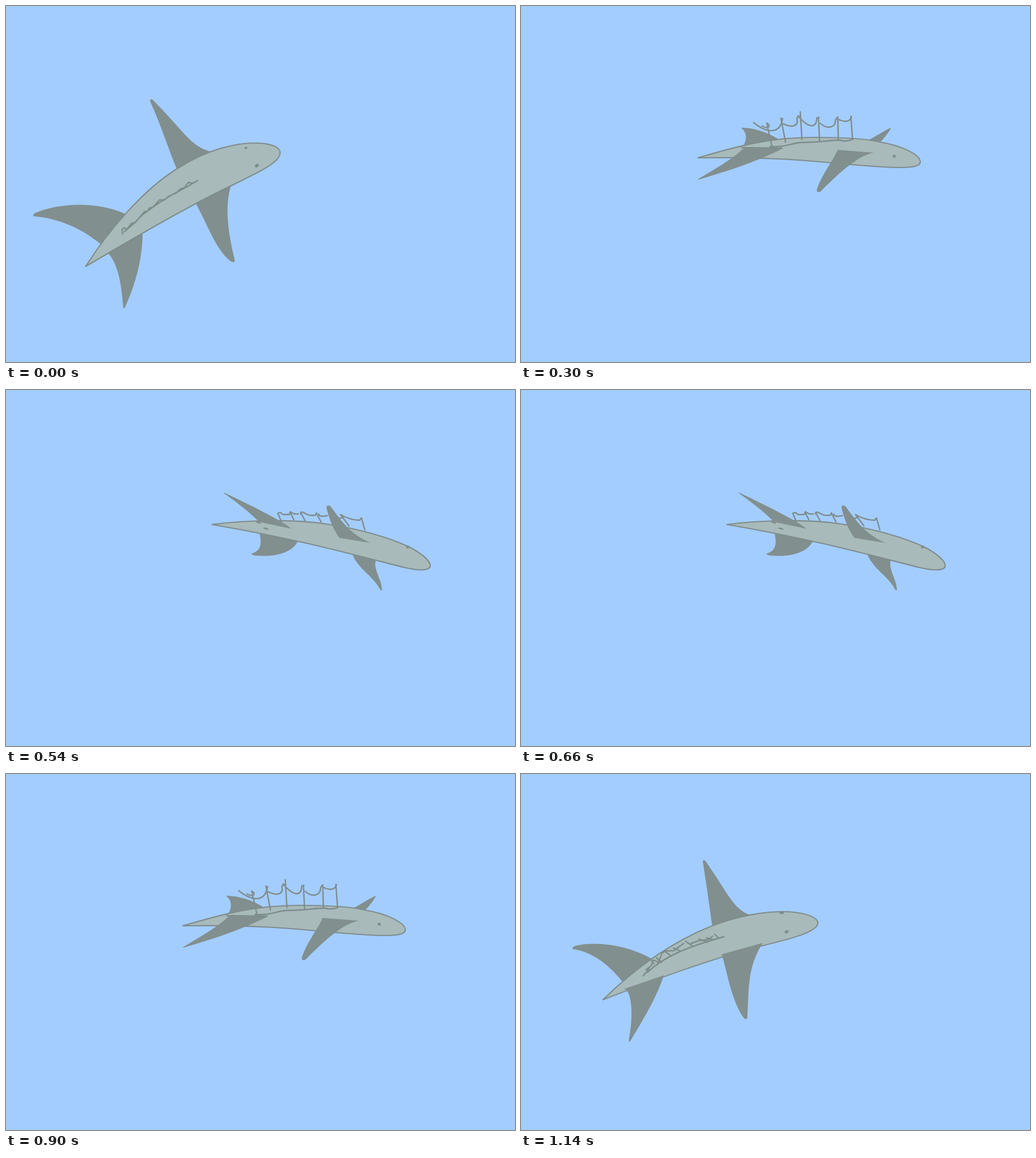
An HTML page with a canvas that plays this animation: 895 by 626 pixels, repeating every 1.2 s.

```html
<!DOCTYPE html>
<html>
<head>
<meta charset="utf-8">
<style>
html, body { margin: 0; width: 100%; height: 100%; overflow: hidden; background: #a3cdff; }
canvas { display: block; }
</style>
</head>
<body>
<canvas id="stage" width="895" height="626"></canvas>
<script>
const ctx = document.getElementById('stage').getContext('2d');
const STEP = 60, STEPS = 20;
const SKY = '#a3cdff', SKIN = '#a8baba', FIN = '#828f8f', LINE = '#7f8c8c';

// Key poses; "at" is the step on the way out. Far fins lie behind the body, near fins before it.
const poses = [
  {
    at: 0,
    body: 'M140 458C180 395 240 324 301 286C355 251 405 241 438 241C466 241 482 248 482 258C482 276 440 294 396 316C320 352 225 408 140 458Z',
    farPec: 'M365 257C325 249 315 222 259 166C256 162 252 165 254 169C272 208 285 250 300 286Z',
    farTail: 'M211 366C160 343 95 346 51 364C47 367 47 370 50 370C90 373 130 389 167 419Z',
    nearPec: 'M397 312C383 350 391 400 402 446C403 451 399 452 394 448C368 427 355 385 332 344Z',
    nearTail: 'M240 397C241 440 228 490 209 530C208 533 206 532 206 529C203 490 198 455 179 434Z',
    eye: 'M440 281.5L442 280',
    marks: 'M420.5 249.5L423 248.5M421 250.5L423 250M205 401L204 393 208 390 212 393 221 382 227 381 243 362 249 361 252 355 258 354 270 341 279 341 285 335 299 329 306 322 314 319 321 310 327 312 337 307M208 397L224 383 240 367 268 347 290 333 320 317 335 308'
  },
  {
    at: 1,
    body: 'M144 397C200 342 265 295 336 267C380 250 425 242 459 242C495 242 522 251 522 262C522 278 470 291 424 302C330 326 235 362 144 397Z',
    farPec: 'M404 248C374 240 362 206 325 154C322 150 319 151 320 156C326 194 331 230 336 266Z',
    farTail: 'M230 325C195 305 140 292 96 302C91 304 88 307 92 308C122 312 152 332 179 366Z',
    nearPec: 'M425 297C398 340 401 375 398 428C398 432 394 432 391 428C370 398 363 350 353 317Z',
    nearTail: 'M251 354C240 390 215 432 192 470C190 472 189 470 190 465C198 425 195 380 181 378Z',
    eye: 'M466 278L468 277',
    marks: 'M456 244L461 243M456 245L460 245M457 243L461 244M215 355L225 342M222 349C255 318 300 302 357 286M220 344L229 337 233 327 241 331 247 318M228 326L234 334M238 323L247 331M247 316L254 311 268 311 286 298M252 311L264 320M268 306L279 311M289 294L301 302M299 298L313 293 330 291 337 285M313 290L328 296M326 288L340 292M341 282L348 289'
  },
  {
    at: 3,
    body: 'M246 324C290 300 320 284 354 270C400 250 440 223 540 223C585 223 615 234 615 246C615 262 560 269 508 276C420 287 330 307 246 324Z',
    farPec: 'M519 222C517 203 513 187 510 176C509 173 507 173 505 176C500 190 491 209 485 227Z',
    farTail: 'M354 268C330 255 305 244 277 246C274 246 271 248 273 249C289 255 294 270 295 296Z',
    nearPec: 'M527 255C498 276 475 330 457 388C455 393 450 393 449 388C446 350 455 305 460 263Z',
    nearTail: 'M361 284C350 304 300 350 240 399C238 400 238 399 239 397C262 368 288 326 297 297Z',
    eye: 'M565 246L565.5 246',
    marks: 'M338 276L338 276.5M337 262L339 250 353 268M354 237L368 261M377 229L400 252M391 209L422 239M425 211L449 235M456 207L472 235M480 207L486 235M340 251Q354 262 356 238Q368 243 379 230Q398 247 398 221Q416 225 427 214Q444 227 456 207Q470 223 480 207M354 269Q406 245 450 235M461 236L470 232 479 237 487 233'
  },
  {
    at: 5,
    body: 'M311 267C370 250 430 231 515 231C570 231 610 234 630 239C672 246 702 262 702 274C702 284 680 284 660 284C560 281 500 264 311 267Z',
    farPec: 'M631 240C638 233 645 224 650 216C650 215 649 214 648 215C636 221 622 230 609 237Z',
    farTail: 'M454 235C430 220 410 215 389 214C387 214 387 215 389 216C398 224 397 237 390 247Z',
    nearPec: 'M621 258C595 262 565 288 529 324C524 330 518 328 521 320C530 295 546 276 557 253Z',
    nearTail: 'M459 251C425 269 370 289 313 305C310 306 310 305 312 304C342 286 372 269 392 250Z',
    eye: 'M656 264L656.5 264',
    marks: 'M388 249L459 250M438 247C465 249 475 241 494 240C530 240 560 233 565 237Q578 238 584 234M432 206L441 246M457 197L465 239M491 186L494 235M523 196L525 238M557 195L558 235M580 194L583 235M409 205C430 222 455 228 460 198M424 211C438 219 439 208 432 206M461 207C475 214 489 213 485 197L489 194M487 193C505 215 520 216 520 197L524 196M526 206C537 217 554 215 553 200L556 196M557 199Q577 208 581 195'
  },
  {
    at: 9,
    body: 'M362 236.5C420 229 500 226 566 236C620 244 672 259 707 275C733 288 746 301 746 309C746 318 725 318 700 312C590 284 500 260 362 236.5Z',
    farPec: 'M650 300C646 316 660 332 661 350C661 353 660 353 658 351C645 326 620 316 609 289Z',
    farTail: 'M513 266C505 283 480 295 437 291C431 289 430 288 434 287C450 281 449 268 446 252Z',
    nearPec: 'M641 269C606 253 593 235 571 205C567 201 562 203 564 209C569 230 577 247 586 260Z',
    nearTail: 'M502 244C481 227 430 203 385 181C382 180 382 180 384 182C405 197 425 212 445 232Z',
    eye: 'M706 276L706.5 276',
    marks: 'M441 232L447 234M454 243L460 244.5M478 217L484 231M500 216L506 228M518 215L526 230M546 217L554 232M589 220L603 239M625 225L631 246M478 217Q481 213 487 219L498 219 500 214Q506 219 514 218M518 218Q518 212 526 217T544 220L546 216M550 218Q550 224 565 221M586 226L592 224M588 219C600 226 612 229 622 229L625 225'
  }
];

const numbers = path => path.match(/[\d.]+/g).map(Number);

function blend(from, to, k) {
  const ends = numbers(to);
  let i = 0;
  return from.replace(/[\d.]+/g, n => +n + (ends[i++] - n) * k);
}

function fill(path, color) {
  ctx.fillStyle = color;
  ctx.fill(new Path2D(path));
}

function stroke(path, width) {
  ctx.lineWidth = width;
  ctx.stroke(new Path2D(path));
}

// Turn, scale and move so that one body's tail-to-nose axis lands on another's.
function alignAxis(from, to) {
  const a = numbers(from), b = numbers(to);
  const ux = a[18] - a[0], uy = a[19] - a[1];
  const vx = b[18] - b[0], vy = b[19] - b[1];
  const len = ux * ux + uy * uy;
  const c = (ux * vx + uy * vy) / len, s = (ux * vy - uy * vx) / len;
  ctx.transform(c, s, -s, c, b[0] - c * a[0] + s * a[1], b[1] - s * a[0] - c * a[1]);
}

function drawShark(step) {
  const next = poses.find(p => p.at >= step) || poses[poses.length - 1];
  const prev = poses[Math.max(0, poses.indexOf(next) - 1)];
  const k = next === prev ? 0 : Math.min(1, (step - prev.at) / (next.at - prev.at));
  const part = name => blend(prev[name], next[name], k);
  const body = part('body');

  ctx.save();
  if (step > 9) {            // last dip at the turning point
    ctx.translate(787, 310);
    ctx.rotate(5 * Math.PI / 180);
    ctx.translate(-747, -310);
  }
  ctx.lineCap = ctx.lineJoin = 'round';
  ctx.strokeStyle = LINE;
  const nearFins = () => {
    fill(part('nearPec'), FIN);
    fill(part('nearTail'), FIN);
  };
  fill(part('farPec'), FIN);
  fill(part('farTail'), FIN);
  if (step === 0) nearFins();   // seen from above, all fins are under the body
  fill(body, SKIN);
  stroke(body, 2.1);
  stroke(part('eye'), 5);

  ctx.save();
  const nearest = k < 0.5 ? prev : next;
  alignAxis(nearest.body, body);
  stroke(nearest.marks, 2.4);
  ctx.restore();

  if (step > 0) nearFins();
  ctx.restore();
}

function frame() {
  const n = Math.floor(performance.now() / STEP) % STEPS;
  ctx.fillStyle = SKY;
  ctx.fillRect(0, 0, 895, 626);
  drawShark(Math.min(n, STEPS - n));
  requestAnimationFrame(frame);
}
frame();
</script>
</body>
</html>
```
